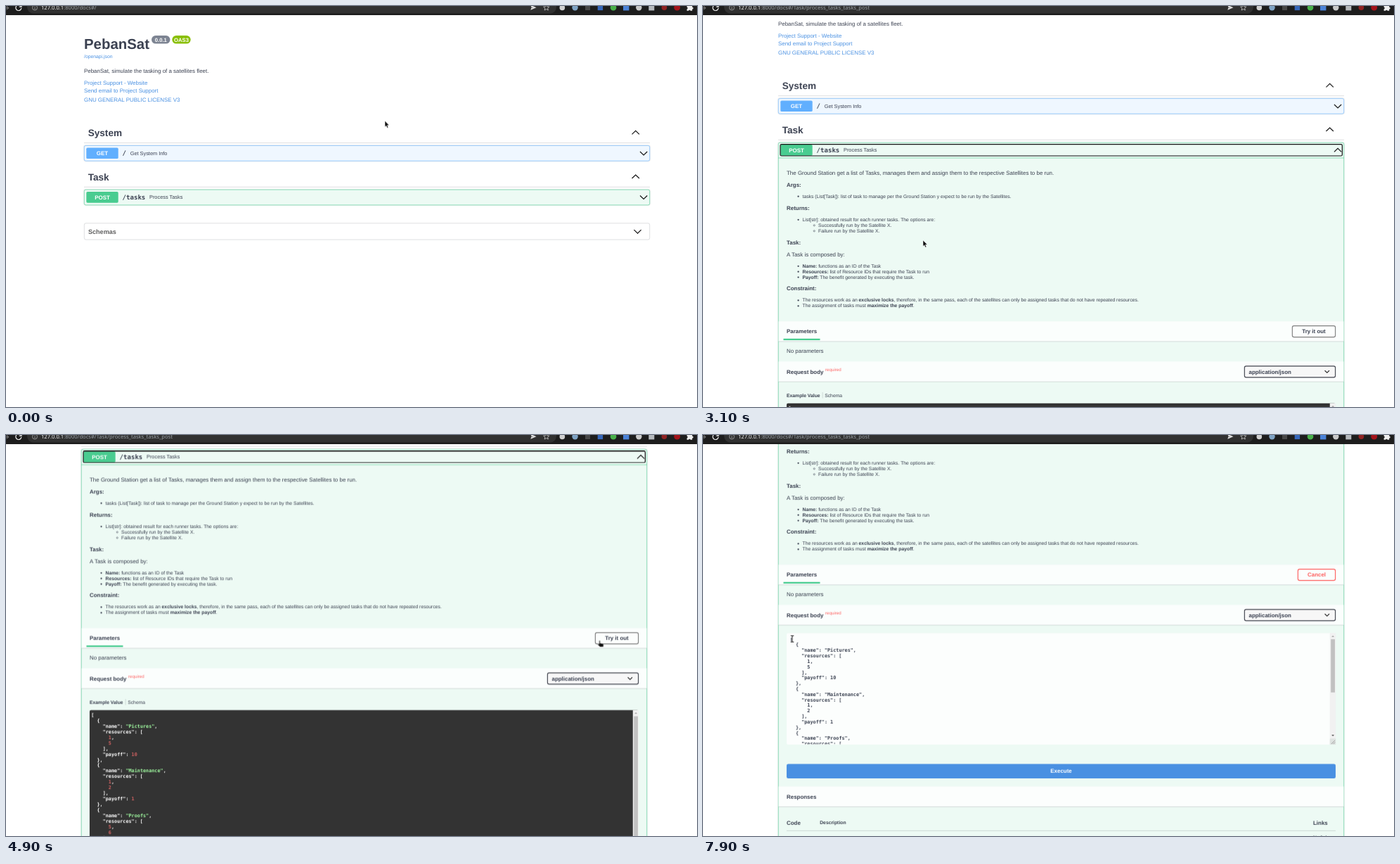
An HTML page for the animation above (8000 ms loop, 983 by 570 pixels).

```html
<!DOCTYPE html>
<html lang="en">
<head>
<meta charset="utf-8">
<title>API docs</title>
<style>
html, body { margin: 0; width: 100%; height: 100%; overflow: hidden; background: #fff; }
svg { display: block; width: 983px; height: 570px; }
text { font: 7.94px "Liberation Sans", Arial, sans-serif; fill: #3b4151; text-rendering: geometricPrecision; }
.b { font-weight: 700; }
.s { font-size: 6.8px; }
.h { font-size: 13.6px; font-weight: 700; }
.m { text-anchor: middle; }
.w { fill: #fff; }
.a { fill: #4990e2; }
.mono { font: 700 9.07px "DejaVu Sans Mono", monospace; }
.code text { font: 700 6.8px "DejaVu Sans Mono", monospace; }
.dark text { fill: #fff; }
.dark .str { fill: #a2fca2; }
.dark .num { fill: #d36363; }
.url { font: 7.6px "Noto Sans", sans-serif; fill: #9aa0a6; }
.line { fill: none; stroke: #3b4151; stroke-opacity: .3; stroke-width: .57; }
.arrow { fill: none; stroke: #111; stroke-width: 1.15; }
.glow { fill: none; stroke: #000; stroke-opacity: .06; stroke-width: 2.2; }
.get { fill: #eff7ff; stroke: #61affe; stroke-width: .6; }
.post { fill: #edfaf4; stroke: #49cc90; stroke-width: .6; }
.band { fill: #fff; fill-opacity: .8; }
.ring { fill: none; stroke: #111; stroke-width: 1.2; }

.page, .cursor, .closed, .open, .focus, .try, .edit, .cancel, .point, .hand, .beam {
  animation: 8s step-end infinite;
}
.page { animation-name: scroll; }
@keyframes scroll {
  0% { transform: translate(111px, 0); }
  25% { transform: translate(106.9px, 0); }
  38.75% { transform: translate(106.9px, -67px); }
  42.5% { transform: translate(106.9px, -135px); }
  50% { transform: translate(106.9px, -198.6px); }
  53.75% { transform: translate(106.9px, -240.7px); }
  80% { transform: translate(106.9px, -251.4px); }
  85%, 100% { transform: translate(106.9px, -330.9px); }
}
.closed { animation-name: closed; }
@keyframes closed { 0% { opacity: 1; } 25%, 100% { opacity: 0; } }
.open { animation-name: open; }
@keyframes open { 0% { opacity: 0; } 25%, 100% { opacity: 1; } }
.focus { animation-name: focus; }
@keyframes focus { 0% { opacity: 0; } 23.75% { opacity: 1; } 66.25%, 100% { opacity: 0; } }
.try { animation-name: try; }
@keyframes try { 0% { opacity: 1; } 66.25%, 100% { opacity: 0; } }
.edit { animation-name: edit; }
@keyframes edit { 0% { opacity: 0; } 66.25%, 100% { opacity: 1; } }
.cancel { animation-name: redden; }
.cancel text { fill: currentColor; }
@keyframes redden { 0% { color: #a8575f; } 70%, 100% { color: #ff6060; } }

.cursor { animation-name: move; }
@keyframes move {
  0% { transform: translate(539px, 163.3px); }
  11.25% { transform: translate(489px, 186px); }
  12.5% { transform: translate(401px, 219px); }
  13.75% { transform: translate(291px, 247px); }
  15% { transform: translate(190px, 264px); }
  16.25% { transform: translate(122px, 270px); }
  17.5% { transform: translate(158px, 274px); }
  18.75% { transform: translate(211.3px, 274.2px); }
  30% { transform: translate(218px, 276px); }
  31.25% { transform: translate(225px, 277px); }
  38.75% { transform: translate(313px, 333px); }
  46.25% { transform: translate(316.3px, 328px); }
  53.75% { transform: translate(334.3px, 324.7px); }
  57.5% { transform: translate(738.3px, 305px); }
  61.25% { transform: translate(841.5px, 291.7px); }
  66.25% { transform: translate(866px, 286.5px); }
  75% { transform: translate(586.3px, 254.3px); }
  80% { transform: translate(555px, 262.5px); }
  85% { transform: translate(553.5px, 260.5px); }
  90% { transform: translate(193px, 290px); }
  95% { transform: translate(129px, 289.5px); }
  98.75%, 100% { transform: translate(127px, 289.7px); }
}
.point { animation-name: point; }
@keyframes point {
  0% { opacity: 1; } 15% { opacity: 0; } 38.75% { opacity: 1; }
  61.25% { opacity: 0; } 75% { opacity: 1; } 90%, 100% { opacity: 0; }
}
.hand { animation-name: hand; }
@keyframes hand {
  0% { opacity: 0; } 15% { opacity: 1; } 38.75% { opacity: 0; }
  61.25% { opacity: 1; } 75%, 100% { opacity: 0; }
}
.beam { animation-name: beam; }
@keyframes beam { 0% { opacity: 0; } 90%, 100% { opacity: 1; } }
.point path, .hand path { fill: #111; stroke: #fff; stroke-width: .5; }
</style>
</head>
<body>
<svg viewBox="0 0 983 570">
<defs>
  <clipPath id="area"><rect x="12" y="612.4" width="773" height="158"/></clipPath>
</defs>

<g class="page">
  <text x="0" y="60.8" class="b" style="font-size:20.4px">PebanSat</text>
  <rect x="96" y="42" width="26.5" height="11.6" rx="5.8" fill="#7d8492"/>
  <text x="109.3" y="50.6" class="b w m" style="font-size:7.7px">0.0.1</text>
  <rect x="125.3" y="42" width="26.4" height="11.6" rx="5.8" fill="#89bf04"/>
  <text x="138.5" y="50.6" class="b w m" style="font-size:7.7px">OAS3</text>
  <text x="0" y="73.7" class="s a">/openapi.json</text>
  <text x="0" y="94.8">PebanSat, simulate the tasking of a satellites fleet.</text>
  <text x="0" y="112.3" class="a">Project Support - Website</text>
  <text x="0" y="122.5" class="a">Send email to Project Support</text>
  <text x="0" y="135.5" class="a">GNU GENERAL PUBLIC LICENSE V3</text>

  <text x="5.7" y="185" class="h">System</text>
  <path class="arrow" d="M779.5 182.3l5.2-5 5.2 5"/>
  <path class="line" d="M0 194.6h805"/>
  <rect class="glow" x="0" y="198.2" width="805" height="22.1" rx="2.3"/>
  <rect class="get" x=".3" y="198.4" width="804.4" height="21.8" rx="2.3"/>
  <rect x="3.3" y="201.5" width="45.4" height="15.6" rx="1.7" fill="#61affe"/>
  <text x="26" y="212.1" class="b w m">GET</text>
  <text x="54.6" y="212.4" class="mono">/</text>
  <text x="65.7" y="211.8" style="font-size:7.37px">Get System Info</text>
  <path class="arrow" d="M791 207l5.1 5 5.1-5"/>

  <text x="5.7" y="247.5" class="h">Task</text>
  <path class="arrow" d="M779.5 245l5.2-5 5.2 5"/>
  <path class="line" d="M0 257.3h805"/>

  <g class="closed">
    <rect class="glow" x="0" y="260.9" width="805" height="22.1" rx="2.3"/>
    <rect class="post" x=".3" y="261.1" width="804.4" height="21.8" rx="2.3"/>
    <path class="arrow" d="M791 269.5l5.1 5 5.1-5"/>
    <rect class="line" x=".3" y="308.8" width="804.4" height="23.3" rx="2.3"/>
    <text x="6" y="323.5" class="b" style="font-size:9.07px;fill:#606060">Schemas</text>
    <path class="arrow" d="M782.4 318.2l5.1 5 5.1-5"/>
  </g>

  <g class="open">
    <rect class="glow" x="0" y="260.9" width="805" height="700" rx="2.3"/>
    <rect class="post" x=".3" y="261.1" width="804.4" height="700" rx="2.3"/>
    <path d="M0 283h805" stroke="#49cc90" stroke-width=".57"/>
    <path class="arrow" d="M791 274.3l5.1-5 5.1 5"/>

    <text x="12" y="307.3">The Ground Station get a list of Tasks, manages them and assign them to the respective Satellites to be run.</text>
    <text x="12" y="324.1" class="b">Args:</text>
    <text x="34.5" y="339.7" class="s">tasks (List[Task]): list of task to manage per the Ground Station y expect to be run by the Satellites.</text>
    <text x="12" y="356.9" class="b">Returns:</text>
    <text x="34.5" y="372.8" class="s">List[str]: obtained result for each runner tasks. The options are:</text>
    <text x="57.1" y="380.8" class="s">Successfully run by the Satellite X.</text>
    <text x="57.1" y="388.8" class="s">Failure run by the Satellite X.</text>
    <text x="12" y="405.8" class="b">Task:</text>
    <text x="12" y="422.8">A Task is composed by:</text>
    <text x="34.5" y="438.8" class="s"><tspan class="b">Name:</tspan> functions as an ID of the Task</text>
    <text x="34.5" y="446.7" class="s"><tspan class="b">Resources:</tspan> list of Resource IDs that require the Task to run</text>
    <text x="34.5" y="454.6" class="s"><tspan class="b">Payoff:</tspan> The benefit generated by executing the task.</text>
    <text x="12" y="471.4" class="b">Constraint:</text>
    <text x="34.5" y="487.4" class="s">The resources work as an <tspan class="b">exclusive locks</tspan>, therefore, in the same pass, each of the satellites can only be assigned tasks that do not have repeated resources.</text>
    <text x="34.5" y="495.4" class="s">The assignment of tasks must <tspan class="b">maximize the payoff</tspan>.</text>
    <g id="dots" fill="#3b4151"></g>

    <rect class="band" y="515.3" x=".5" width="804" height="28.5"/>
    <path class="line" d="M.5 543.9h804"/>
    <text x="12" y="532.2" class="b">Parameters</text>
    <rect x="7.5" y="539.8" width="52" height="2.3" fill="#49cc90"/>
    <text x="12" y="559.6">No parameters</text>
    <rect class="band" y="572.4" x=".5" width="804" height="28.6"/>
    <path class="line" d="M.5 601.1h804"/>
    <text x="12" y="589.5" class="b">Request body</text>
    <text x="67" y="586.2" style="font-size:6.2px;fill:#f66">required</text>
    <rect x="663.4" y="578.8" width="129.2" height="16" rx="2.3" fill="#f7f7f7" stroke="#41444e" stroke-width="1.15"/>
    <text x="669.5" y="589.5" class="b">application/json</text>
    <path class="arrow" d="M777.6 585.2l3.2 3.1 3.2-3.1"/>

    <g class="try">
      <rect x="731.4" y="521.6" width="61.2" height="16" rx="2.3" fill="#fff" fill-opacity=".3" stroke="#808080" stroke-width="1.15"/>
      <text x="762" y="532.2" class="b m">Try it out</text>
      <text x="12" y="622.6" class="s b">Example Value</text>
      <path class="line" d="M63.2 616v8.5"/>
      <text x="66.2" y="622.6" class="s">Schema</text>
      <rect x="12" y="631.8" width="781" height="290" rx="2" fill="#333"/>
      <rect x="784.8" y="631.8" width="8.4" height="290" fill="#f1f1f1"/>
      <path d="M787.2 637l1.9-2 1.9 2z" fill="#a3a3a3"/>
      <rect x="786.2" y="640.5" width="5.8" height="270" fill="#c1c1c1"/>
      <g class="code dark" id="sample"></g>
    </g>

    <g class="edit">
      <g class="cancel">
        <rect x="739.4" y="521.6" width="53.2" height="16" rx="2.3" fill="none" stroke="currentColor" stroke-width="1.15"/>
        <text x="766" y="532.2" class="b m">Cancel</text>
      </g>
      <rect class="band" x="12" y="612.4" width="781" height="158.6" rx="2"/>
      <g class="code" id="body" clip-path="url(#area)"></g>
      <rect x="784.8" y="612.4" width="8.4" height="158.6" fill="#f1f1f1"/>
      <path d="M787.2 618l1.9-2 1.9 2z" fill="#a3a3a3"/>
      <rect x="786.2" y="621.2" width="5.8" height="75.6" fill="#c1c1c1"/>
      <path d="M787.2 757l1.9 2 1.9-2z" fill="#505050"/>
      <rect x="784.8" y="762.4" width="8.4" height="8.6" fill="#dfe3e1"/>
      <path d="M787 770l5.2-5.2M789.7 770l2.5-2.5" stroke="#777" stroke-width=".6"/>

      <rect x="12" y="798.4" width="781" height="20.6" rx="2.3" fill="#4990e2"/>
      <text x="402.5" y="811.2" class="b w m">Execute</text>
      <rect class="band" x=".5" y="830.5" width="804" height="28.7"/>
      <path class="line" d="M.5 859.3h804"/>
      <text x="12" y="847.7" class="b">Responses</text>
      <text x="12" y="884.7" class="b">Code</text>
      <text x="59.2" y="884.3" class="s b">Description</text>
      <text x="761" y="884.7" class="b">Links</text>
      <path class="line" d="M12 893.4h781"/>
      <text x="761" y="905.4" class="s" font-style="italic">No links</text>
    </g>
  </g>

  <rect x="3.3" y="264.1" width="45.4" height="15.6" rx="1.7" fill="#49cc90"/>
  <text x="26" y="274.7" class="b w m">POST</text>
  <text x="54.6" y="275" class="mono">/tasks</text>
  <text x="93" y="274.4" style="font-size:7.37px">Process Tasks</text>
  <rect class="ring focus" x="3" y="263.7" width="799.4" height="16.3" rx="1.8"/>
</g>

<g>
  <rect width="983" height="13" fill="#1d1d1d"/>
  <rect x="30" y="-10" width="753" height="20.6" rx="9" fill="#313131"/>
  <path d="M-1 2.8h4.5M1 .2l2.6 2.6L1 5.4" fill="none" stroke="#888"/>
  <path d="M21.2 .2a4 4 0 1 0 .7 2.6M22 -2v3.2h-3.2" fill="none" stroke="#eee" stroke-width="1.2"/>
  <circle cx="41" cy="2.4" r="3.5" fill="none" stroke="#aaa" stroke-width=".8"/>
  <path d="M41 2v2.4M41 .3v.9" stroke="#aaa" stroke-width=".9"/>
  <text x="50" y="5.3" class="url"><tspan fill="#eee">127.0.0.1</tspan>:8000/docs#/<tspan class="open">Task/process_tasks_tasks_post</tspan></text>
  <path d="M746.3 -1.4l8.2 3.6-8.2 3.6 1-3.2 3-.4-3-.4z" fill="#ddd"/>
  <path d="M768.7 -1.8l1.2 2.7 2.9.3-2.2 1.9.7 2.9-2.6-1.5-2.6 1.5.7-2.9-2.2-1.9 2.9-.3z" fill="none" stroke="#ccc" stroke-width=".8"/>
  <circle cx="791.3" cy="2.4" r="3.8" fill="#d0d0d0"/>
  <circle cx="809.5" cy="2.2" r="4.2" fill="#7fa3c4"/>
  <rect x="824" y="-1" width="7" height="7" fill="#474747"/>
  <rect x="841.7" y="-1.5" width="7.4" height="7.6" fill="#3567ba"/>
  <circle cx="864" cy="2.2" r="4.3" fill="#48b04a"/>
  <rect x="878" y="-2" width="8.4" height="8.4" fill="#4a82d8"/>
  <circle cx="900.3" cy="2.2" r="4.2" fill="#c9c9c9"/>
  <rect x="914.3" y="-2" width="8" height="8.4" fill="#b5b9bd"/>
  <circle cx="936.4" cy="2.2" r="3.8" fill="#8f2323"/>
  <circle cx="954.7" cy="2.2" r="4.4" fill="#a3131a"/>
  <path d="M968.6 -1.2h2.4a1.5 1.5 0 0 1 3 0h2.2v2.6a1.5 1.5 0 0 1 0 3v2.4h-2.5a1.4 1.4 0 0 0-2.7 0h-2.4v-2.4a1.5 1.5 0 0 0 0-2.9z" fill="#eee"/>
</g>

<g class="cursor">
  <g class="point"><path d="M0 0v8.6l1.9-1.7 1.4 3.2 1.5-.7-1.4-3.1h2.7z"/></g>
  <g class="hand"><path d="M2.2 5.4V1a.8.8 0 0 1 1.6 0v3.1l4 .9c.7.2 1 .7.9 1.4l-.5 3.2H3.6L.5 6.4c-.5-.7.2-1.4.9-1z"/></g>
  <g class="beam" fill="none">
    <path d="M-2.3 -4.4h4.6M0 -4.4v8.8M-2.3 4.4h4.6" stroke="#fff" stroke-width="1.9"/>
    <path d="M-2.3 -4.4h4.6M0 -4.4v8.8M-2.3 4.4h4.6" stroke="#222"/>
  </g>
</g>
</svg>

<script>
const byId = id => document.getElementById(id);
const tasks = [["Pictures", [1, 5], 10], ["Maintenance", [1, 2], 1], ["Proofs", [5, 6], 1]]
  .map(([name, resources, payoff]) => ({ name, resources, payoff }));
const lines = JSON.stringify(tasks, null, 2).split("\n");

const colour = line => line
  .replace(/\d+/, '<tspan class="num">$&</tspan>')
  .replace(/: ("\w+")/, ': <tspan class="str">$1</tspan>');

function printCode(id, x, y, pitch) {
  byId(id).innerHTML = lines.map((line, i) => {
    const indent = line.search(/\S/) * 4.094;
    return `<text x="${x + indent}" y="${y + i * pitch}">${colour(line.trim())}</text>`;
  }).join("");
}
printCode("sample", 14.3, 641, 7.94);
printCode("body", 16.8, 623.6, 7.82);

const bullet = y => `<circle cx="28.6" cy="${y}" r="1.15"/>`;
const ringBullet = y => `<circle cx="51.3" cy="${y}" r="1.1" fill="none" stroke="#3b4151" stroke-width=".55"/>`;
byId("dots").innerHTML =
  [337.7, 370.8, 436.8, 444.7, 452.6, 485.4, 493.4].map(bullet).join("") +
  [378.8, 386.8].map(ringBullet).join("");
</script>
</body>
</html>
```
